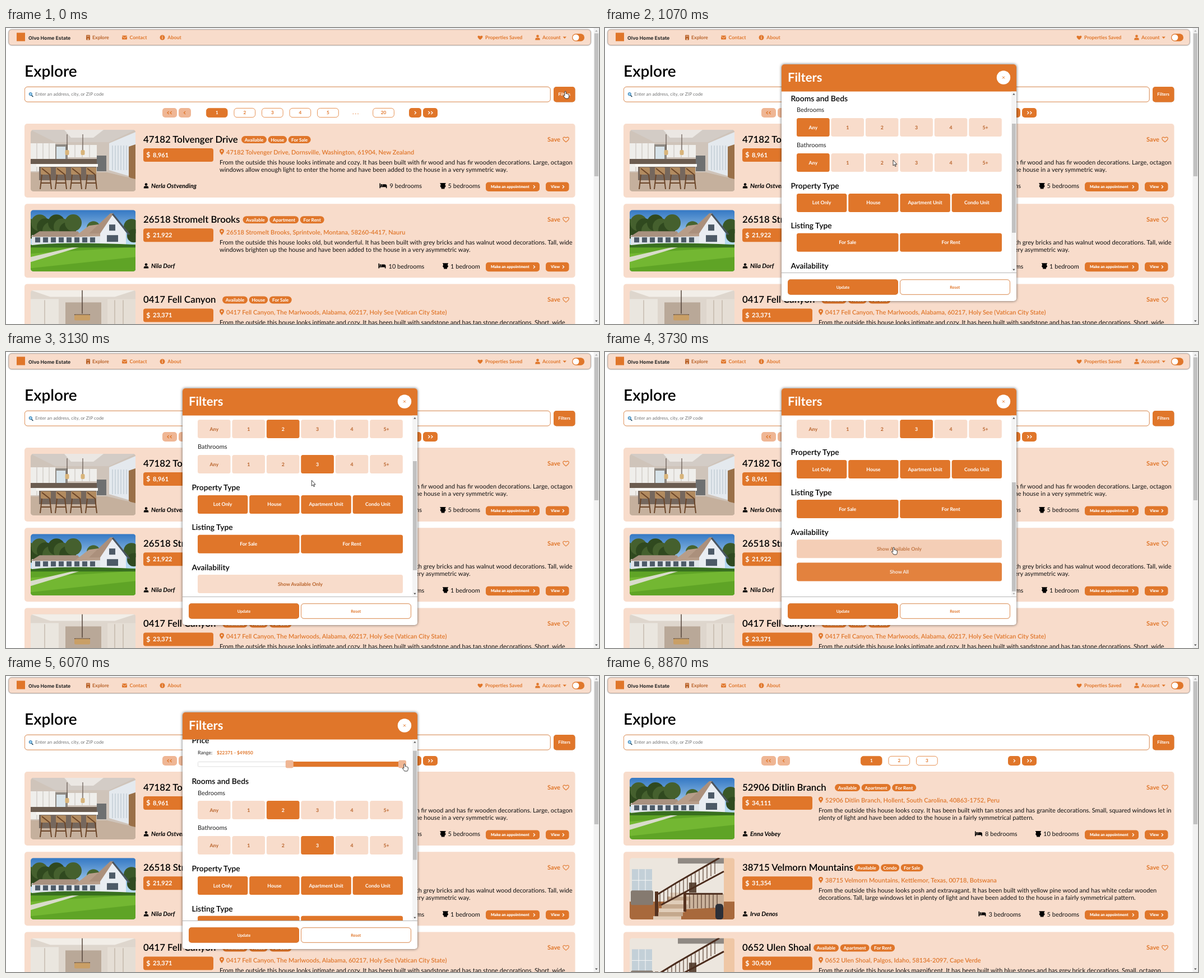
Write an HTML page that moves like this. It is 1058x529 px and loops after 9.67 s.

```html
<!DOCTYPE html>
<html lang="en">
<head>
<meta charset="utf-8">
<title>Explore</title>
<style>
html, body { margin: 0; width: 100%; height: 100%; overflow: hidden; background: #fff; }
svg { display: block; }
#stage { width: 1058px; height: 529px; font-family: Lato, sans-serif; text-rendering: geometricPrecision; }
.bar { filter: drop-shadow(0 .6px .8px #0008); }
.lift { filter: drop-shadow(0 .4px .5px #0004); }
#modal { filter: drop-shadow(0 0 2.5px #0009); }
</style>
</head>
<body>
<svg id="stage" viewBox="0 0 1058 529"></svg>
<script>
const LOOP = 9670, ORANGE = '#e0762a', PALE = '#f8dccb', FADED = '#efb694', BROWN = '#b9632a';

// ---------- drawing helpers ----------
const rect = (x, y, w, h, fill, r = 0, more = '') =>
  `<rect x="${x}" y="${y}" width="${w}" height="${h}" rx="${r}" fill="${fill}" ${more}/>`;
const text = (x, y, size, str, fill = '#000', weight = 700, more = '') =>
  `<text x="${x}" y="${y}" font-size="${size}" fill="${fill}" font-weight="${weight}" ${more}>${str}</text>`;
const mid = (x, y, size, str, fill, weight) => text(x, y, size, str, fill, weight, 'text-anchor="middle"');
const path = (d, fill, more = '') => `<path d="${d}" fill="${fill}" ${more}/>`;
const line = (d, color, width = 1) => path(d, 'none', `stroke="${color}" stroke-width="${width}"`);
const circle = (x, y, r, fill) => `<circle cx="${x}" cy="${y}" r="${r}" fill="${fill}"/>`;
const at = (x, y, body, more = '') => `<g transform="translate(${x} ${y})" ${more}>${body}</g>`;
const border = `stroke="${ORANGE}" stroke-width=".8"`;
const chevron = (x, y, color, dir = 1, s = 2.2) =>
  line(`M${x - dir * s / 2} ${y - s * 1.2}l${dir * s * 1.2} ${s * 1.2}l${-dir * s * 1.2} ${s * 1.2}`, color, 1.3);

const heart = 'M0 4.7C-9-1.4-4.6-6.4 0-2.6C4.6-6.4 9-1.4 0 4.7Z';
const user = color => circle(0, -2.4, 2.3, color) +
  path('M-4.2 4.4V3Q-4.2.6-1.8.6H1.8Q4.2.6 4.2 3V4.4Z', color);
const pin = path('M0 5.6C-1.4 3-4 .8-4-1.6a4 4 0 0 1 8 0C4 .8 1.4 3 0 5.6Z', ORANGE) + circle(0, -1.5, 1.4, PALE);
const bed = path('M0-4.5H1.6V.5H5.6V-2.7H10.6Q13-2.7 13-.2V4.3H11.4V2.3H1.6V4.3H0Z', '#000') + circle(3.6, -1.3, 1.6, '#000');
const toilet = path('M0-5H10V-3.6H9V-.4H10.2Q10 2.6 8 3.4V5.4H2.2V3.4Q.2 2.6 0-.4H1V-3.6H0Z', '#000');

// ---------- photos, 187 x 110 ----------
const kitchen = () => {
  let s = rect(0, 0, 187, 110, '#cfc4ba') + path('M0 0H187L140 22H44Z', '#d3ccc6') + path('M60 0H130L112 14H72Z', '#ebe7e3') +
    rect(0, 24, 44, 50, '#efeeeb') + line('M11 24V74M22 24V74M33 24V74', '#c4beb7') +
    rect(66, 27, 52, 22, '#efeeeb') + line('M79 27V49M92 27V49M105 27V49', '#c4beb7') +
    rect(44, 26, 22, 34, '#8f8a84') + rect(46, 30, 16, 22, '#d7e3e9') + rect(0, 52, 118, 9, '#6b5c50') +
    rect(118, 46, 17, 28, '#6e7071') + path('M140 24L187 4V86L140 72Z', '#e4e9ee') +
    path('M175 30L187 26V92L175 84Z', '#9a7048') + path('M0 76H136L187 88V110H0Z', '#c5b09d');
  for (let x = 146; x < 174; x += 5) s += line(`M${x} 28V72`, '#b3c0ca');
  s += rect(10, 61, 110, 5, '#f8f6f2') + rect(15, 66, 102, 24, '#75675d');
  for (const x of [18, 45, 72, 99]) s += rect(x, 67, 18, 13, '#b28b60', 2) +
    line(`M${x + 2} 80L${x - 1} 106M${x + 16} 80L${x + 19} 106M${x} 95H${x + 18}M${x + 2} 69L${x + 16} 80`, '#6b4528', 2);
  for (const x of [65, 93]) s += line(`M${x} 8V38`, '#4b3d35') + rect(x - 3.5, 36, 7, 9, '#d8b47a', 2);
  return s;
};
const kitchen2 = () => rect(0, 0, 187, 110, '#ded6cd') + path('M0 0H187L150 12H35Z', '#f2eee8') +
  rect(0, 16, 50, 94, '#eae6df') + rect(137, 16, 50, 94, '#e5ded5') + rect(62, 22, 64, 40, '#b9a898') +
  line('M25 18V110M150 18V110M165 18V110', '#b4a597') + line('M92 0V42M78 44H106', '#4a3a30', 1.4) +
  rect(78, 44, 28, 10, '#c99f66', 2) + rect(30, 62, 130, 48, '#8a6b50');
const house = () => {
  let s = rect(0, 0, 187, 110, 'url(#sky)');
  for (let i = 0; i < 9; i++) s += circle(i * 10 - 4, 30 + 8 * Math.sin(i * 2.1), 15, i % 2 ? '#30491f' : '#45602e');
  s += circle(112, 32, 12, '#46642f') + circle(180, 30, 14, '#3a5828') + circle(184, 46, 12, '#2f4a20') +
    rect(0, 62, 187, 48, '#5fa426') + path('M0 78L187 66V84L0 104Z', '#73b732') + path('M0 84L82 65H92L0 93Z', '#d9dccb') +
    rect(2, 45, 142, 19, '#dfe5ea') + path('M0 48L16 38H84L92 48Z', '#a8917f') + path('M78 48L104 28L150 22L166 46Z', '#b79d89') +
    path('M124 62V38L146 8L170 40V62Z', '#e9edf2') + path('M104 42L142 6H148L124 42Z', '#ab907c') + line('M146 7L176 44', '#4b555f', 3);
  for (let x = 8; x < 120; x += 14) s += rect(x, 49, 9, 9, '#4d5b68');
  s += rect(140, 26, 11, 11, '#4d5a67') + rect(136, 45, 20, 12, '#4d5a67') + path('M0 63Q60 56 187 62V67H0Z', '#386f1f');
  return s;
};
const stairs = () => {
  let s = rect(0, 0, 187, 110, '#ece6de') + rect(86, 0, 82, 10, '#8f8983') + rect(4, 20, 36, 40, '#c3d0d8') +
    line('M16 20V60M28 20V60M4 40H40', '#f7f7f5') + rect(168, 0, 19, 110, '#efc7a5') + rect(0, 78, 187, 32, '#a8693c') +
    rect(2, 58, 40, 26, '#857a70', 3) + rect(106, 44, 13, 18, '#5f4a3b') + path('M96 92V64H168V88Z', '#cbb39c');
  for (let i = 0; i < 7; i++) s += rect(42 + i * 5, 104 - i * 7, 50 - i * 2, 7, i % 2 ? '#c4a88d' : '#e0cdb9');
  for (let i = 0; i < 15; i++) s += line(`M${54 + i * 7} ${62 - i * 4.1}v24`, '#4e3224', 1.1);
  for (let i = 0; i < 9; i++) s += line(`M${100 + i * 7} 64v26`, '#4e3224', 1.1);
  return s + line('M48 66L84 44L160 0M56 84L168 24M98 64H166', '#4b2c1d', 3) + rect(45, 60, 6, 44, '#55321f') +
    rect(96, 62, 5, 34, '#55321f') + rect(153, 82, 14, 28, '#2b2f38', 5);
};

// ---------- listing ----------
const pillWidth = { Available: 45, House: 33.5, Apartment: 52, Condo: 33, 'For Sale': 40, 'For Rent': 43 };
const pills = (x, names) => names.map(name => {
  const w = pillWidth[name], out = rect(x, 22, w, 13, ORANGE, 6.5) + mid(x + w / 2, 31.6, 8.3, name, '#fff');
  x += w + 2.6;
  return out;
}).join('');

function card(i, c) {
  const [bedX, bathX] = c.icons;
  return at(0, 171 + i * 143.2,
    rect(33, 0, 982.5, 132, PALE, 5) +
    at(44, 11, c.photo(), 'clip-path="url(#photo)"') +
    text(245, 34, 16.8, c.street, '#000', 600) + pills(c.pillX, c.tags) +
    rect(245, 44, 125, 24, ORANGE, 4) + text(250.3, 60.4, 12.4, '$', '#fff') + text(262, 60, 11, c.price, '#fff') +
    at(385, 50.5, pin) + text(393, 54.5, 11.02, `${c.street}, ${c.place}`, ORANGE, 600) +
    c.about.map((row, n) => text(381, 73 + n * 13.3, 11.02, row, '#111', 400)).join('') +
    at(250, 111, user('#000')) + text(259, 115, 11, c.owner || '', '#000', 700, 'font-style="italic"') +
    at(bedX, 111, bed) + text(bedX + 18, 115.4, 11.02, c.beds, '#111', 400) +
    at(bathX, 111, toilet) + text(bathX + 14, 115.4, 11.02, c.baths, '#111', 400) +
    rect(856, 104.5, 96, 16.5, ORANGE, 5) + rect(963, 104.5, 41.5, 16.5, ORANGE, 5) +
    text(865, 115.3, 6.95, 'Make an appointment', '#fff', 900) + chevron(942, 112.8, '#fff') +
    text(972, 115.3, 6.95, 'View', '#fff', 900) + chevron(994, 112.8, '#fff') +
    text(966, 31.5, 11, 'Save', ORANGE) +
    at(999, 28, path(heart, 'none', `stroke="${ORANGE}" stroke-width="1.1"`)));
}

const pageBox = (x, w, label, on) =>
  rect(x + .4, 143.4, w - .8, 16.2, on ? ORANGE : '#fff', 5, border) +
  mid(x + w / 2, 154.4, 8.2, label, on ? '#fff' : ORANGE);
const pager = (first, labels) => labels.map((label, i) => {
  const x = first + i * 49.55;
  return label === '. . .' ? mid(x + 19, 154, 9, label, ORANGE) : pageBox(x, 38.5, label, i === 0);
}).join('');

const before = [
  { street: '47182 Tolvenger Drive', place: 'Dornsville, Washington, 61904, New Zealand', price: '8,961', owner: 'Nerla Ostvending',
    pillX: 420, tags: ['Available', 'House', 'For Sale'], photo: kitchen, icons: [666.5, 774.5], beds: '9 bedrooms', baths: '5 bedrooms',
    about: ['From the outside this house looks intimate and cozy. It has been built with fir wood and has fir wooden decorations. Large, octagon',
      'windows allow enough light to enter the home and have been added to the house in a very symmetric way.'] },
  { street: '26518 Stromelt Brooks', place: 'Sprintvole, Montana, 58260-4417, Nauru', price: '21,922', owner: 'Nila Dorf',
    pillX: 422.5, tags: ['Available', 'Apartment', 'For Rent'], photo: house, icons: [664.5, 779], beds: '10 bedrooms', baths: '1 bedroom',
    about: ['From the outside this house looks old, but wonderful. It has been built with grey bricks and has walnut wood decorations. Tall, wide',
      'windows brighten up the house and have been added to the house in a very asymmetric way.'] },
  { street: '0417 Fell Canyon', place: 'The Marlwoods, Alabama, 60217, Holy See (Vatican City State)', price: '23,371',
    pillX: 386, tags: ['Available', 'House', 'For Sale'], photo: kitchen2, icons: [666, 774], beds: '', baths: '',
    about: ['From the outside this house looks intimate and cozy. It has been built with sandstone and has tan stone decorations. Short, wide'] }
];
const after = [
  { street: '52906 Ditlin Branch', place: 'Hollent, South Carolina, 40863-1752, Peru', price: '34,111', owner: 'Enna Vobey',
    pillX: 410, tags: ['Available', 'Apartment', 'For Rent'], photo: house, icons: [660, 768], beds: '8 bedrooms', baths: '10 bedrooms',
    about: ['From the outside this house looks cozy. It has been built with tan stones and has granite decorations. Small, squared windows let in',
      'plenty of light and have been added to the house in a fairly symmetrical pattern.'] },
  { street: '38715 Velmorn Mountains', place: 'Kettlemor, Texas, 00718, Botswana', price: '31,354', owner: 'Irva Denos',
    pillX: 444.5, tags: ['Available', 'Condo', 'For Sale'], photo: stairs, icons: [666.5, 774.5], beds: '3 bedrooms', baths: '5 bedrooms',
    about: ['From the outside this house looks posh and extravagant. It has been built with yellow pine wood and has white cedar wooden',
      'decorations. Tall, large windows let in plenty of light and have been added to the house in a fairly symmetrical pattern.'] },
  { street: '0652 Ulen Shoal', place: 'Palgos, Idaho, 58134-2097, Cape Verde', price: '30,430',
    pillX: 372, tags: ['Available', 'Apartment', 'For Rent'], photo: stairs, icons: [666, 774], beds: '', baths: '',
    about: ['From the outside this house looks magnificent. It has been built with blue stones and has grey brick decorations. Small, octagon'] }
];

// ---------- page frame ----------
const nav = rect(5, 3, 1038, 27.5, PALE, 5, 'class="bar" stroke="#a98d7d" stroke-width=".5"') +
  rect(19, 8.5, 15, 15, ORANGE) +
  text(40, 21.2, 8.7, 'Olvo Home Estate', '#2a2a2a', 700, 'font-family="Inter, sans-serif"') +
  rect(143, 12.5, 7, 9, BROWN, 1) + rect(144.6, 14, 1.4, 1.4, PALE) + rect(147, 14, 1.4, 1.4, PALE) + rect(145.7, 18.5, 1.6, 3, PALE) +
  text(154, 20.2, 8.82, 'Explore', BROWN) +
  rect(207, 13.5, 9, 7, ORANGE, 1) + line('M207 14.7L211.5 18L216 14.7', PALE, .9) + text(220.5, 20.2, 8.82, 'Contact', ORANGE) +
  circle(279, 17, 4.5, ORANGE) + line('M279 14V15.2M279 16.2V19.6', PALE, 1.3) + text(288.3, 20.2, 8.82, 'About', ORANGE) +
  at(846, 17, path(heart, ORANGE, 'transform="scale(.85)"')) + text(855, 20.2, 8.82, 'Properties Saved', ORANGE) +
  at(948.5, 17, user(ORANGE)) + text(957, 20.2, 8.82, 'Account', ORANGE) + path('M993.5 15.5h6.4l-3.2 3.6z', ORANGE) +
  rect(1010, 10.3, 22, 13.4, ORANGE, 6.7) + circle(1016.8, 17, 5.6, '#fff');

const frame = nav + text(33, 87, 28, 'Explore', '#000', 600) +
  rect(33.4, 105.2, 937.8, 26.8, '#fff', 5, `class="lift" ${border}`) +
  line('M45.4 120.2L48.4 123', '#23495f', 1.6) + `<circle cx="43.8" cy="118" r="2.6" fill="#9ad0f0" stroke="#2a76ad"/>` +
  text(52, 121.4, 8.3, 'Enter an address, city, or ZIP code', '#777', 400) +
  rect(977, 105, 38.5, 27.5, ORANGE, 5, 'class="lift"') + mid(996.2, 121.3, 7.8, 'Filters', '#fff') +
  rect(279, 143, 26, 17, FADED, 5) + chevron(289.5, 151.5, ORANGE, -1) + chevron(294.5, 151.5, ORANGE, -1) +
  rect(308, 143, 22, 17, FADED, 5) + chevron(319, 151.5, ORANGE, -1) +
  rect(719, 143, 22, 17, ORANGE, 5) + chevron(730, 151.5, '#fff') +
  rect(744, 143, 26, 17, ORANGE, 5) + chevron(754.5, 151.5, '#fff') + chevron(759.5, 151.5, '#fff') +
  rect(1048.5, 0, 9.5, 529, '#f1f1f1') + rect(1049.7, 9.5, 7.3, 255.5, '#c1c1c1') +
  path('M1051 6.5h4.6l-2.3-2.8z', '#aaa') + path('M1051 522.5h4.6l-2.3 2.8z', '#505050');

// ---------- filter dialog ----------
// A choice has an active layer that fades in (dir 1) or out (dir -1) at a given time.
const choice = (x, y, w, label, on, when) => {
  const layer = (bg, fg) => rect(x, y, w, 33, bg, 3.5) + mid(x + w / 2, y + 19.6, 8.82, label, fg);
  const mark = when ? `class="switch" data-at="${when}" data-dir="${on ? -1 : 1}"` : '';
  return layer(PALE, BROWN) + (on || when ? `<g ${mark}>${layer(ORANGE, '#fff')}</g>` : '');
};
const rooms = (y, when, picked) => ['Any', 1, 2, 3, 4, '5+'].map((label, i) =>
  choice(342 + i * 61.45, y, 58.6, label, i === 0, i === 0 || i === picked ? when : 0)).join('');
const heading = (y, label) => text(331.5, y + 4.8, 13.9, label, '#000', 600);
const label = (y, str, size = 11.02) => text(342, y + 3.6, size, str, '#222', 400);

const options = heading(133, 'Price') + label(154, 'Range:', 8.82) + text(376, 158, 8.3, '', ORANGE, 700, 'id="range"') +
  rect(342.5, 171, 365, 8.5, '#fff', 1, 'stroke="#ddd"') + rect(342, 170.6, 0, 9.2, ORANGE, 0, 'id="fill"') +
  rect(335, 168, 14, 14, FADED, 3, 'id="knob"') + rect(700, 168, 14, 14, FADED, 3) +
  heading(206, 'Rooms and Beds') + label(226.5, 'Bedrooms') + rooms(240.7, 2130, 2) +
  label(289.2, 'Bathrooms') + rooms(303.6, 2730, 3) +
  heading(362, 'Property Type') + ['Lot Only', 'House', 'Apartment Unit', 'Condo Unit'].map((s, i) =>
    choice(342 + i * 92.25, 375.5, 89.3, s, true)).join('') +
  heading(433.3, 'Listing Type') + choice(342, 446.4, 181.5, 'For Sale', true) + choice(526.3, 446.4, 181.7, 'For Rent', true) +
  heading(504.4, 'Availability') + choice(342, 517.7, 366, 'Show Available Only', false, 3700) +
  choice(342, 559, 366, 'Show All', true, 3700);

const modal = rect(315, 65, 419, 423, '#fff', 5) + path('M315 113.5V70a5 5 0 0 1 5-5H729a5 5 0 0 1 5 5V113.5Z', ORANGE) +
  text(326, 96.3, 22.1, 'Filters', '#fff') + circle(711, 88.5, 12.2, '#fff') + line('M709 86.5l4 4m0-4l-4 4', ORANGE, 1) +
  `<g clip-path="url(#body)"><g id="options">${options}</g></g>` +
  rect(725, 113.5, 8.5, 323.5, '#f4f4f4') + rect(726, 123, 7, 195, '#c1c1c1', 0, 'id="thumb"') +
  path('M727.2 119.5h4.4l-2.2-2.7z', '#505050', 'id="up"') + path('M727.2 430.8h4.4l-2.2 2.7z', '#505050', 'id="down"') +
  line('M315 437.5H734', '#b5b5b5') +
  `<g id="update"><g class="lift">${rect(326, 449.3, 197, 27.5, ORANGE, 5)}</g>${mid(424.5, 465.7, 7.25, 'Update', '#fff')}</g>` +
  `<g class="lift">${rect(526.5, 449.8, 196, 26.5, '#fff', 5, border)}</g>` + mid(624.3, 465.7, 7.25, 'Reset', ORANGE);

const outline = 'stroke="#111" stroke-width=".8" stroke-linejoin="round"';
const arrow = path('M0 0V10L2.3 8L3.8 11.5L5.3 10.8L3.8 7.5H6.8Z', '#fff', `id="arrow" ${outline}`);
const hand = path('M-1.2 8V.8Q0-.8 1.2.8V4.5Q2.6 3.8 3.3 5Q4.6 4.5 5.1 5.7Q6.4 5.6 6.4 7V9.5Q6 12 5 13H0Q-1.5 11-3.8 7.8Q-3 6.3-1.2 8Z',
  '#fff', `id="hand" ${outline}`);

const stage = document.getElementById('stage');
stage.innerHTML = `<defs>
  <linearGradient id="sky" x2="0" y2="1"><stop stop-color="#3478c4"/><stop offset=".5" stop-color="#b4d8f0"/></linearGradient>
  <clipPath id="photo">${rect(0, 0, 187.5, 110, '#000', 5)}</clipPath>
  <clipPath id="body">${rect(315, 113.5, 410, 323.5, '#000')}</clipPath></defs>` + frame +
  `<g id="before">${pager(357, [1, 2, 3, 4, 5, '. . .', 20])}${before.map((c, i) => card(i, c)).join('')}</g>` +
  `<g id="after">${pager(456, [1, 2, 3])}${after.map((c, i) => card(i, c)).join('')}</g>` +
  `<g id="modal">${modal}</g><g id="cursor">${arrow}${hand}</g>`;

// ---------- motion: rows are [time, value...] ----------
const scrollSteps = [[600, 0], [1070, 79.5], [1330, 110], [3070, 110], [3530, 182.5], [4070, 182.5],
  [4600, 17.5], [6070, 17.5], [6600, 60], [7130, 72.5]];
const knobSteps = [[4670, 0], [4870, .288], [5070, .288], [5270, 22371 / 49850]];
// The last value tells whether the pointer is a hand.
const cursorSteps = [[0, 998, 113, 1], [270, 998, 113, 0], [800, 514, 236, 0], [1400, 514, 236, 0], [2070, 497, 146, 1],
  [2200, 497, 146, 0], [2400, 526, 255, 0], [2670, 550, 211, 1], [3070, 550, 211, 0], [3530, 515, 349, 1], [4070, 515, 349, 0],
  [4600, 342, 157, 1], [4670, 342, 157, 1], [4870, 447, 157, 1], [5070, 447, 157, 1], [5270, 506, 157, 1], [5470, 506, 157, 1],
  [5930, 711, 157, 1], [6130, 711, 157, 0], [6930, 445, 458, 1], [7270, 429, 464, 1], [7730, 429, 464, 0],
  [8070, 429, 464, 0], [8200, 427, 459, 0], [8830, 24, 536, 0]];

const clamp = v => Math.min(1, Math.max(0, v));
const ramp = (t, from, span) => clamp((t - from) / span);
function sample(steps, t) {
  let i = steps.findIndex(s => s[0] > t);
  if (i < 0) return steps[steps.length - 1].slice(1);
  if (i === 0) return steps[0].slice(1);
  const a = steps[i - 1], b = steps[i], p = (t - a[0]) / (b[0] - a[0]);
  return a.slice(1).map((v, k) => v + (b[k + 1] - v) * p);
}

const el = {};
stage.querySelectorAll('[id]').forEach(node => el[node.id] = node);
const switches = [...stage.querySelectorAll('.switch')];
const set = (id, name, value) => el[id].setAttribute(name, value);
const show = (id, on) => set(id, 'visibility', on ? 'visible' : 'hidden');

function draw(t) {
  const updated = t >= 7730;
  show('before', !updated);
  show('after', updated);

  const opening = 1 - (1 - ramp(t, 70, 260)) ** 3;
  set('modal', 'opacity', opening * (1 - ramp(t, 7670, 130)));
  set('modal', 'transform', `translate(0 ${90 * (1 - opening)})`);

  const [scroll] = sample(scrollSteps, t);
  set('options', 'transform', `translate(0 ${-scroll})`);
  set('thumb', 'y', 123 + scroll * .602);
  set('up', 'fill', scroll < 1 ? '#aaa' : '#505050');
  set('down', 'fill', scroll > 182 ? '#aaa' : '#505050');

  const [low] = sample(knobSteps, t), x = 342 + low * 365;
  el.range.textContent = `$${Math.round(low * 49850)} - $49850`;
  set('knob', 'x', x - 7);
  set('fill', 'x', x);
  set('fill', 'width', 707 - x);

  for (const node of switches) {
    const p = ramp(t, +node.dataset.at, 250);
    node.setAttribute('opacity', node.dataset.dir > 0 ? p : 1 - p);
  }
  const hover = ramp(t, 6930, 200);
  set('update', 'opacity', 1 - .18 * hover);
  set('update', 'transform', `translate(424.5 463) scale(${1 - .01 * hover}) translate(-424.5 -463)`);

  const [cx, cy] = sample(cursorSteps, t);
  const current = cursorSteps.filter(s => s[0] <= t).pop();
  set('cursor', 'transform', `translate(${cx} ${cy})`);
  show('hand', current[3]);
  show('arrow', !current[3]);
  set('cursor', 'opacity', t < 8830 ? 1 : 0);
}

const start = performance.now();
(function tick() {
  draw((performance.now() - start) % LOOP);
  requestAnimationFrame(tick);
})();
</script>
</body>
</html>
```
